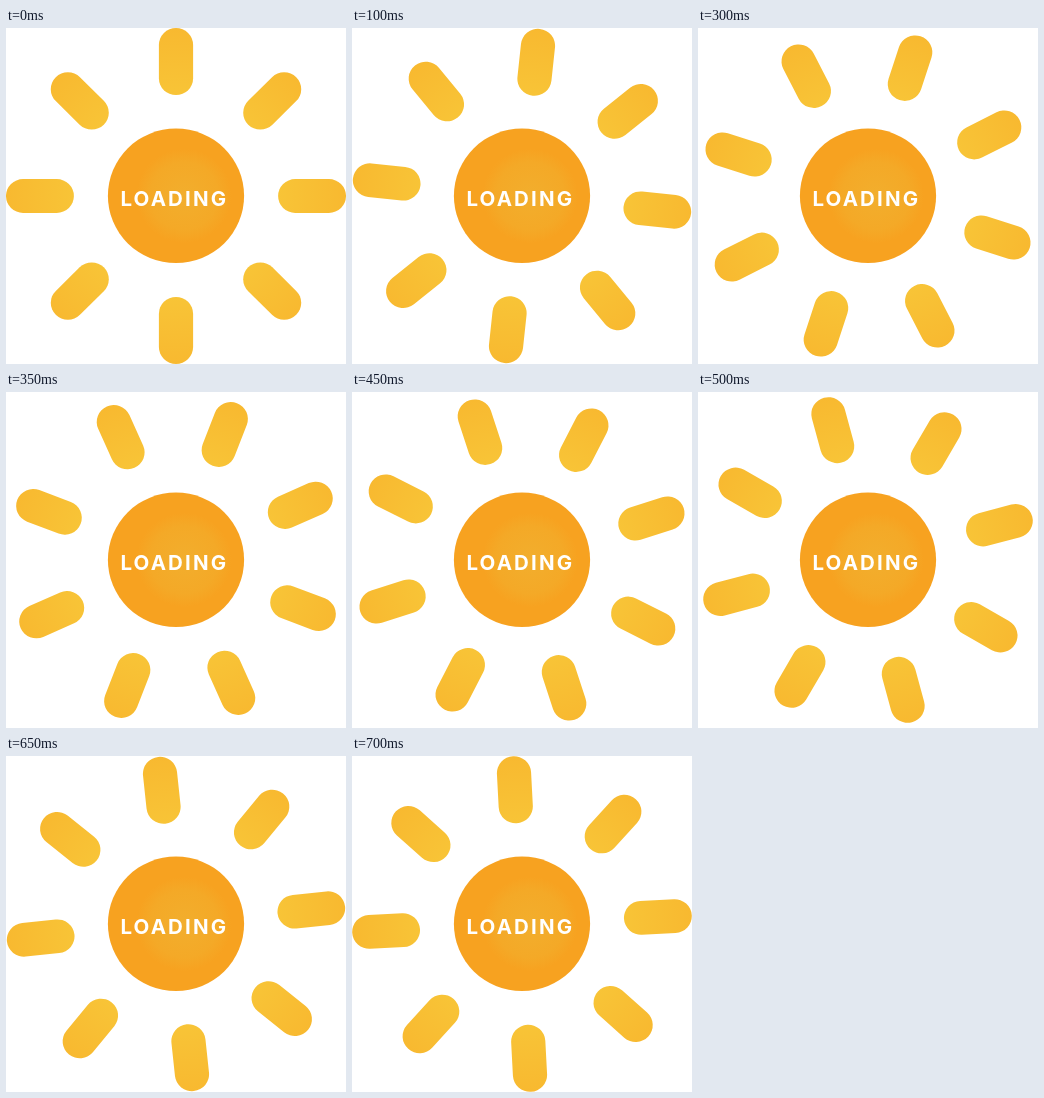
Write an HTML page that moves like this. It is 340 px wide and 336 px high and loops after 750 ms.

```html
<!DOCTYPE html>
<html lang="en">
<head>
<meta charset="utf-8">
<title>Loading sun</title>
<style>
  html, body { margin: 0; width: 100%; height: 100%; overflow: hidden; background: #fff; }
  svg { display: block; }
  text { font: 700 20.5px Inter, "Open Sans", sans-serif; letter-spacing: 2.15px; fill: #fff; }
</style>
</head>
<body>
<svg width="340" height="336" viewBox="0 0 340 336">
  <defs>
    <radialGradient id="rayFill" gradientUnits="userSpaceOnUse" cx="0" cy="0" r="169">
      <stop offset=".6" stop-color="#f8c437"/>
      <stop offset="1" stop-color="#f8b930"/>
    </radialGradient>
    <radialGradient id="discFill" cx=".56" cy=".5" r=".5">
      <stop offset="0" stop-color="#f2ae2d"/>
      <stop offset=".5" stop-color="#f4a927"/>
      <stop offset=".7" stop-color="#f7a220"/>
    </radialGradient>
  </defs>
  <!-- The whole sun is slightly wider than tall. -->
  <g transform="translate(170 168) scale(1.006 .994)">
    <g id="rays" fill="url(#rayFill)"></g>
    <circle r="67.7" cy="-.2" fill="url(#discFill)"/>
  </g>
  <text x="114.4" y="178">LOADING</text>
</svg>
<script>
  const RAYS = 8, LOOP = 750, STEPS = 15;
  const SECTOR = 360 / RAYS;
  const rays = document.getElementById('rays');

  rays.innerHTML = Array.from({ length: RAYS }, (_, i) =>
    `<rect x="-17" y="-169" width="34" height="67.5" rx="17" transform="rotate(${i * SECTOR})"/>`
  ).join('');

  // The sun turns by one ray spacing per loop, in even steps.
  function draw() {
    const step = Math.floor(performance.now() % LOOP / LOOP * STEPS);
    rays.setAttribute('transform', `rotate(${step * SECTOR / STEPS})`);
    requestAnimationFrame(draw);
  }
  draw();
</script>
</body>
</html>
```
